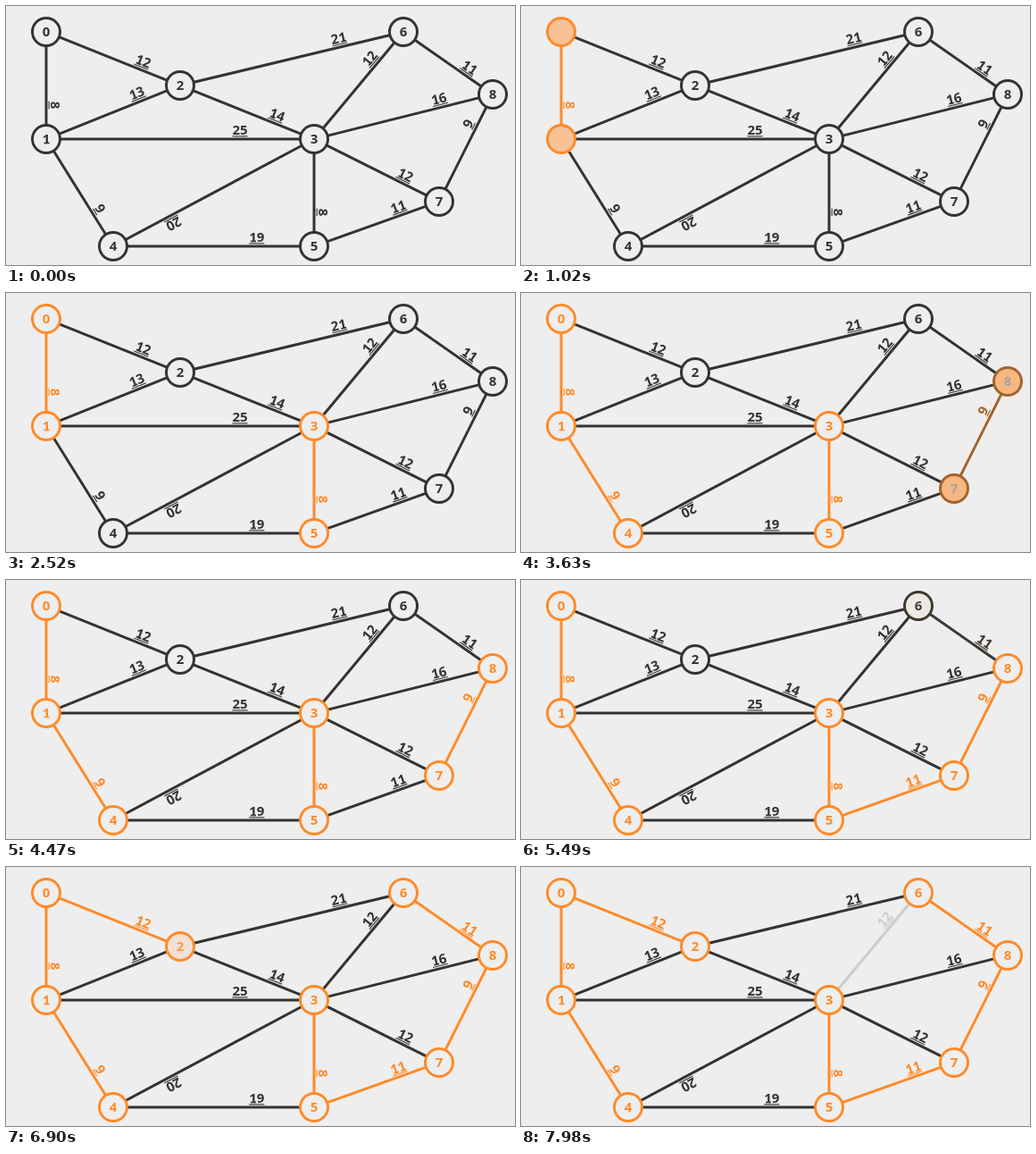
Animation, 570 px wide and 290 px high, one loop 8000 ms. Source, as an HTML page:

```html
<!DOCTYPE html>
<html lang="en">
<head>
<meta charset="utf-8">
<title>Minimum spanning tree</title>
<style>
  html, body { margin: 0; width: 100%; height: 100%; overflow: hidden; background: #eee; }
  svg { display: block; width: 100vw; height: 100vh; }
  text { font: 700 15px "Open Sans", "Noto Sans", sans-serif; text-anchor: middle; }
</style>
</head>
<body>
<svg id="stage" viewBox="0 0 570 290"></svg>
<script>
const LOOP = 8000, FIRST = 560, STEP = 972, PHASE = 300, SECOND = 305;
const RADIUS = 16, DIGIT = 8.58;
const DARK = [51, 51, 51], ORANGE = [255, 138, 39], PAPER = [238, 238, 238];
const WHITE = [255, 255, 255], GREY = [204, 204, 204];

// Each node: position and weights of the edges to later nodes
const graph = [
  { x: 45, y: 29, to: { 1: 8, 2: 12 } },
  { x: 45, y: 149, to: { 2: 13, 3: 25, 4: 9 } },
  { x: 195, y: 89, to: { 3: 14, 6: 21 } },
  { x: 345, y: 149, to: { 4: 20, 5: 8, 6: 12, 7: 12, 8: 16 } },
  { x: 120, y: 269, to: { 5: 19 } },
  { x: 345, y: 269, to: { 7: 11 } },
  { x: 445, y: 29, to: { 8: 11 } },
  { x: 485, y: 219, to: { 8: 9 } },
  { x: 545, y: 99, to: {} }
];

const svg = document.getElementById("stage");

function add(parent, tag, attrs) {
  const el = document.createElementNS("http://www.w3.org/2000/svg", tag);
  for (const key in attrs) el.setAttribute(key, attrs[key]);
  return parent.appendChild(el);
}

// Digits centred on x = 0; each 1 gets a foot
function addNumber(parent, value, y) {
  const digits = String(value);
  add(parent, "text", { y }).textContent = digits;
  [...digits].forEach((digit, i) => {
    if (digit !== "1") return;
    const x = (i - (digits.length - 1) / 2) * DIGIT + 0.6;
    add(parent, "rect", { x: x - 3, y: y - 1.7, width: 6, height: 1.7 });
  });
  return digits.length * DIGIT;
}

function makeEdge(a, b, weight) {
  const from = graph[a], dx = graph[b].x - from.x, dy = graph[b].y - from.y;
  const length = Math.hypot(dx, dy) - 2 * RADIUS;
  const angle = Math.atan2(dy, dx) * 180 / Math.PI;
  const el = add(svg, "g", { transform: `translate(${from.x} ${from.y}) rotate(${angle})` });
  add(el, "rect", { x: RADIUS, y: -1.5, width: length, height: 3 });
  const label = add(el, "g", { transform: `translate(${RADIUS + 0.75 * length} 0)` });
  const width = addNumber(label, weight, -4.7);
  add(label, "rect", { x: -width / 2, y: -3.7, width, height: 1.1 });
  return { a, b, weight, el };
}

function makeNode({ x, y }, id) {
  const group = add(svg, "g", { transform: `translate(${x} ${y})` });
  const ring = add(group, "circle", { r: RADIUS + 1 });
  const disc = add(group, "circle", { r: RADIUS - 2 });
  const label = add(group, "g", {});
  addNumber(label, id, 5.3);
  return { ring, disc, label };
}

const edges = graph.flatMap(({ to }, a) =>
  Object.entries(to).map(([b, weight]) => makeEdge(a, +b, weight)));
const nodes = graph.map(makeNode);

// Kruskal: lightest edge first, rejected when it would close a cycle
function planSteps() {
  const tree = graph.map((_, id) => id);
  const seen = new Set();
  const sorted = [...edges].sort((e, f) => e.weight - f.weight);
  return sorted.map(({ a, b, el }, i) => {
    const rejected = tree[a] === tree[b];
    const reached = [a, b].filter(id => !seen.has(id));
    reached.forEach(id => seen.add(id));
    const merged = tree[b];
    tree.forEach((root, id) => { if (root === merged) tree[id] = tree[a]; });
    return { el, rejected, reached, start: FIRST + i * STEP };
  });
}
const steps = planSteps();

function ease(t) {
  t = Math.min(1, Math.max(0, t));
  return t < 0.5 ? 4 * t ** 3 : 1 - 4 * (1 - t) ** 3;
}

const mix = (a, b, p) => a.map((v, i) => v + (b[i] - v) * p);
const paint = (el, rgb) => el.setAttribute("fill", `rgb(${rgb.map(Math.round)})`);

function paintNode({ ring, disc, label }, p, q) {
  paint(ring, mix(DARK, ORANGE, p));
  paint(disc, mix(mix(PAPER, ORANGE, p), PAPER, q));
  paint(label, mix(mix(DARK, WHITE, p), ORANGE, q));
}

function draw(time) {
  for (const { el, rejected, reached, start } of steps) {
    const p = ease((time - start) / PHASE);
    const q = ease((time - start - SECOND) / PHASE);
    paint(el, mix(mix(DARK, ORANGE, p), GREY, rejected ? q : 0));
    reached.forEach(id => paintNode(nodes[id], p, q));
  }
}

function tick() {
  draw(performance.now() % LOOP);
  requestAnimationFrame(tick);
}
tick();
</script>
</body>
</html>
```
